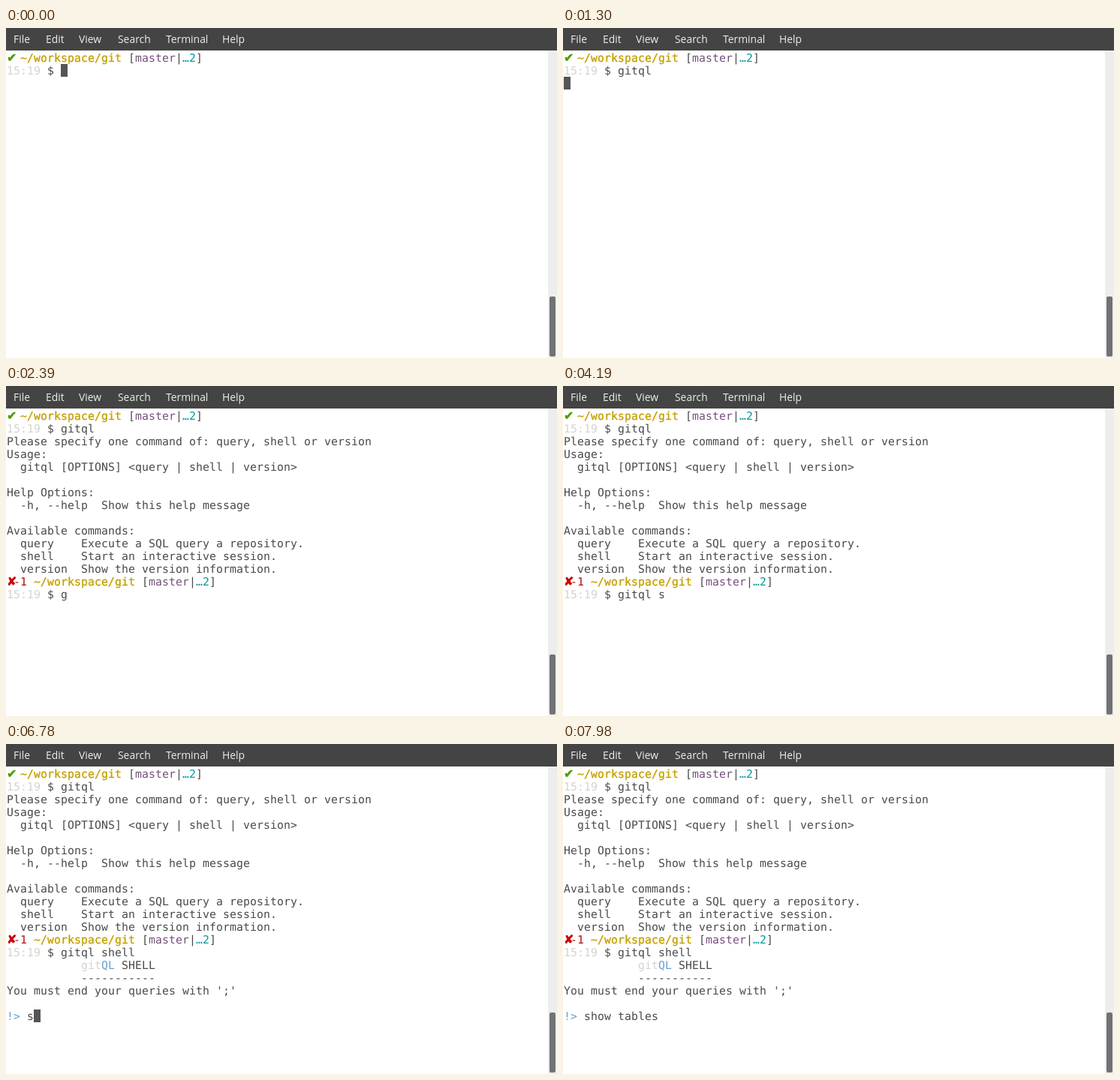
Write an HTML page that moves like this. It is 734 px wide and 440 px high and loops after 8 s.

```html
<!DOCTYPE html>
<html lang="en">
<head>
<meta charset="utf-8">
<title>gitql in a terminal</title>
<style>
  html, body { margin: 0; width: 100%; height: 100%; overflow: hidden; background: #fff; }
  #menu { position: absolute; inset: 0 0 auto; height: 30px; background: #444; }
  #menu span { position: absolute; font: 13.9px/30px "Open Sans", sans-serif; color: #eee; }
  #screen {
    position: absolute; left: 1px; top: 32px; margin: 0; color: #4a4a4a;
    font: 14.8px/17px "DejaVu Sans Mono", monospace;
    letter-spacing: .09px; text-rendering: geometricPrecision;
  }
  #cursor { position: absolute; width: 9px; height: 17px; background: #555; }
  #track { position: absolute; left: 722px; top: 30px; width: 12px; height: 410px; background: #ededed; }
  #thumb { position: absolute; left: 2px; top: 328px; width: 8px; height: 80px; border-radius: 2px; background: #717274; }
  .mark { display: inline-block; width: 9px; font: 16px/0 "DejaVu Sans", sans-serif; -webkit-text-stroke: .5px; }
  .green { color: #4e9a06; }
  .red { color: #c00; }
  .darkred { color: #b01010; }
  .gold { color: #c4a000; -webkit-text-stroke: .35px; }
  .plum { color: #75507b; }
  .teal { color: #06989a; }
  .pale { color: #d3d3cf; }
  .blue { color: #66a0d0; }
</style>
</head>
<body>
<div id="menu"></div>
<div id="track"><div id="thumb"></div></div>
<pre id="screen"></pre>
<div id="cursor"></div>
<script>
const LOOP = 8000, CELL = 9, LINE = 17;
const byId = id => document.getElementById(id);
const terminal = byId('screen'), cursor = byId('cursor');
const ink = (color, text) => `<span class="${color}">${text}</span>`;

const menuItems = { File: 10, Edit: 53, View: 97, Search: 149, Terminal: 213, Help: 288 };
byId('menu').innerHTML = Object.entries(menuItems)
  .map(([name, x]) => `<span style="left:${x}px">${name}</span>`).join('');

const shellPrompt = status => `${status} ${ink('gold', '~/workspace/git')} [${ink('plum', 'master')}|${ink('teal', '…2')}]
${ink('pale', '15:19')} $ `;
const firstPrompt = shellPrompt(ink('mark green', '✔'));
const usage = `${firstPrompt}gitql
Please specify one command of: query, shell or version
Usage:
  gitql [OPTIONS] &lt;query | shell | version&gt;

Help Options:
  -h, --help  Show this help message

Available commands:
  query    Execute a SQL query a repository.
  shell    Start an interactive session.
  version  Show the version information.
`;
const secondPrompt = usage + shellPrompt(ink('mark red', '✘') + ink('darkred', '-1'));
const banner = `${secondPrompt}gitql shell
           ${ink('pale', 'git')}${ink('blue', 'QL')} SHELL
           -----------
You must end your queries with ';'

${ink('blue', '!&gt;')} `;

// Each step: start time, screen contents, cursor visible
const steps = [];
const show = (time, html, caret) => steps.push([time, html, caret]);
const type = (before, text, times, caret) =>
  times.forEach((time, i) => show(time, before + text.slice(0, i + 1), caret));

show(0, firstPrompt, true);
type(firstPrompt, 'gitql', [500, 590, 680, 850, 920], true);
show(1300, firstPrompt + 'gitql\n', true);
show(1330, usage, true);
show(1430, secondPrompt, false);
type(secondPrompt, 'gitql', [2390, 2440, 2550, 2730, 2800], false);
type(secondPrompt + 'gitql ', 'sh', [4190, 4300], false);
type(secondPrompt + 'gitql sh', 'ell', [4410, 4550, 4700], true);
show(4780, secondPrompt + 'gitql shell\n', true);
show(5130, banner, true);
type(banner, 'show', [6780, 6810, 6920, 7030], true);
show(7150, banner + 'show ', false);
type(banner + 'show ', 'tables', [7300, 7400, 7610, 7700, 7800, 7980], false);

let current;
function draw(now) {
  const time = now % LOOP;
  const step = steps.findLast(([start]) => start <= time);
  if (step !== current) {
    current = step;
    terminal.innerHTML = step[1];
    const lines = terminal.textContent.split('\n');
    cursor.hidden = !step[2];
    cursor.style.left = 1 + CELL * lines.at(-1).length + 'px';
    cursor.style.top = 31 + LINE * (lines.length - 1) + 'px';
  }
  requestAnimationFrame(draw);
}
draw(0);
</script>
</body>
</html>
```
